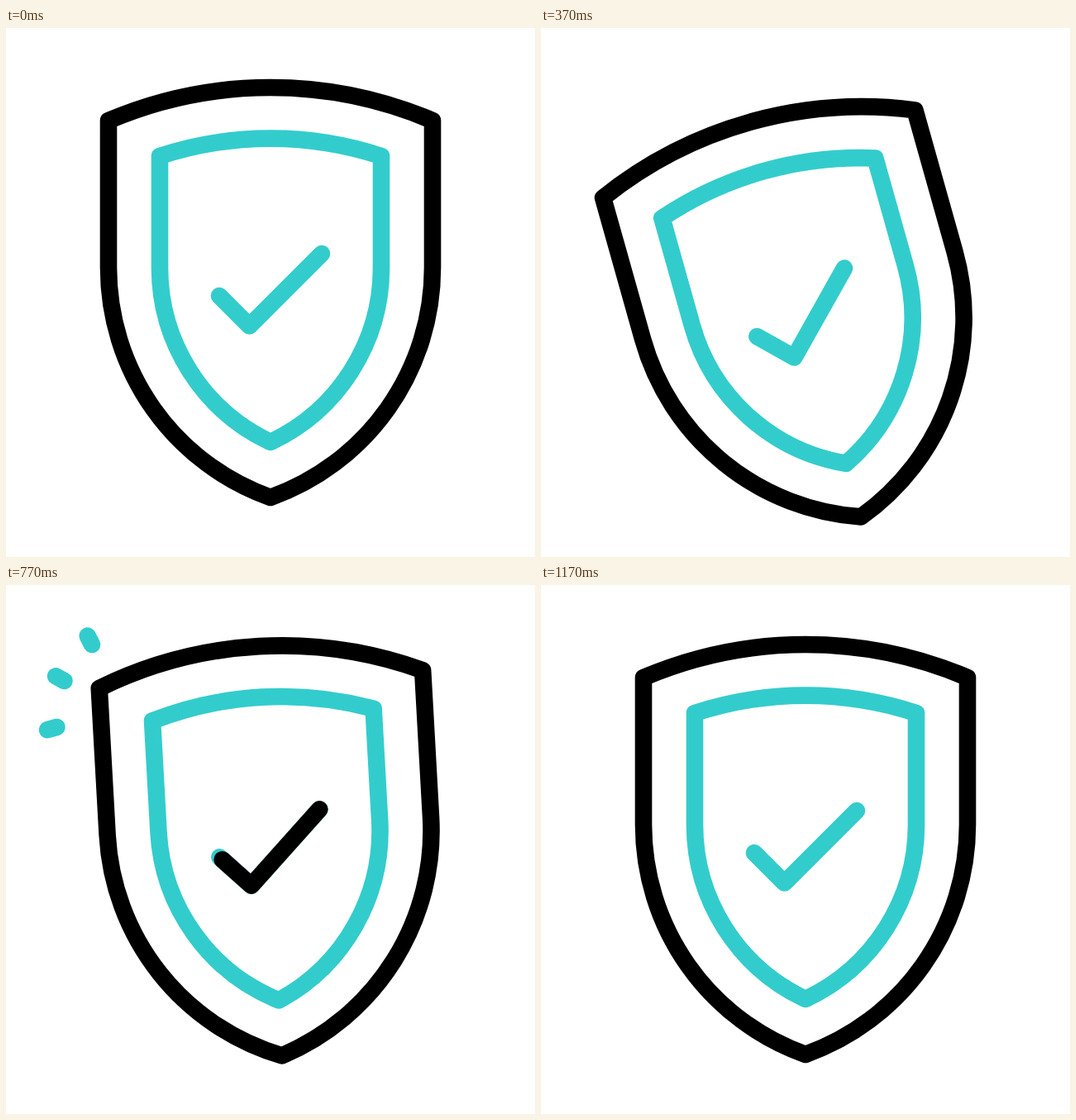
These frames come from a looping animation (640x640 px, 1670 ms). An HTML page without scripts:

```html
<!DOCTYPE html>
<html lang="en">
<head>
<meta charset="utf-8">
<title>Shield check</title>
<style>
  html, body { margin: 0; width: 100%; height: 100%; overflow: hidden; background: #fff; }
  svg { display: block; width: 100%; height: 100%; }

  path {
    fill: none;
    stroke: #33cccc;
    stroke-width: 20.6;
    stroke-linecap: round;
    stroke-linejoin: round;
  }
  .dark { stroke: #000; }

  /* Sine ease in and out between poses. */
  .shield, .sweep, .sparks path {
    animation: 1.67s cubic-bezier(.364, 0, .636, 1) 3ms infinite;
  }
  .shield {
    transform-origin: 320px 320px;
    animation-name: bounce, swing;
  }

  /* One dash as long as the path slides in from its start and out at its end. */
  .sweep, .sparks path {
    stroke-dasharray: 1 2;
    stroke-dashoffset: 1.01;
  }
  .sweep { animation-name: sweep; }
  .sparks path { animation-name: spark; }

  @keyframes bounce {
    0% { translate: 0 0; }
    16% { translate: 0 52px; }
    36% { translate: 0 -41px; }
    54% { translate: 0 32px; }
    70%, 100% { translate: 0 0; }
  }
  @keyframes swing {
    0%, 1% { rotate: 0deg; }
    22% { rotate: -15.7deg; }
    36% { rotate: 8deg; }
    48% { rotate: -4deg; }
    58% { rotate: 1.8deg; }
    64%, 100% { rotate: 0deg; }
  }
  @keyframes sweep {
    0%, 21.4% { stroke-dashoffset: 1.01; }
    44.4% { stroke-dashoffset: 0; }
    60%, 100% { stroke-dashoffset: -1.01; }
  }
  @keyframes spark {
    0%, 42% { stroke-dashoffset: 1.01; }
    52% { stroke-dashoffset: 0; }
    60%, 100% { stroke-dashoffset: -1.01; }
  }
</style>
</head>
<body>
<svg viewBox="0 0 640 640">
  <g class="sparks">
    <path pathLength="1" d="M104 72 88 41"/>
    <path pathLength="1" d="M70.5 116 39.5 99"/>
    <path pathLength="1" d="M61.5 172 27.5 181.5"/>
  </g>
  <g class="shield">
    <path class="dark" d="M124 112A500 500 0 0 1 516 112V290A295 295 0 0 1 320 568A295 295 0 0 1 124 290Z"/>
    <path d="M186 155A430 430 0 0 1 454 155V290A233 233 0 0 1 320 501A233 233 0 0 1 186 290Z"/>
    <path d="M258 324 294.5 360.5 382 273"/>
    <path class="dark sweep" pathLength="1" d="M258 324 294.5 360.5 382 273"/>
  </g>
</svg>
</body>
</html>
```
